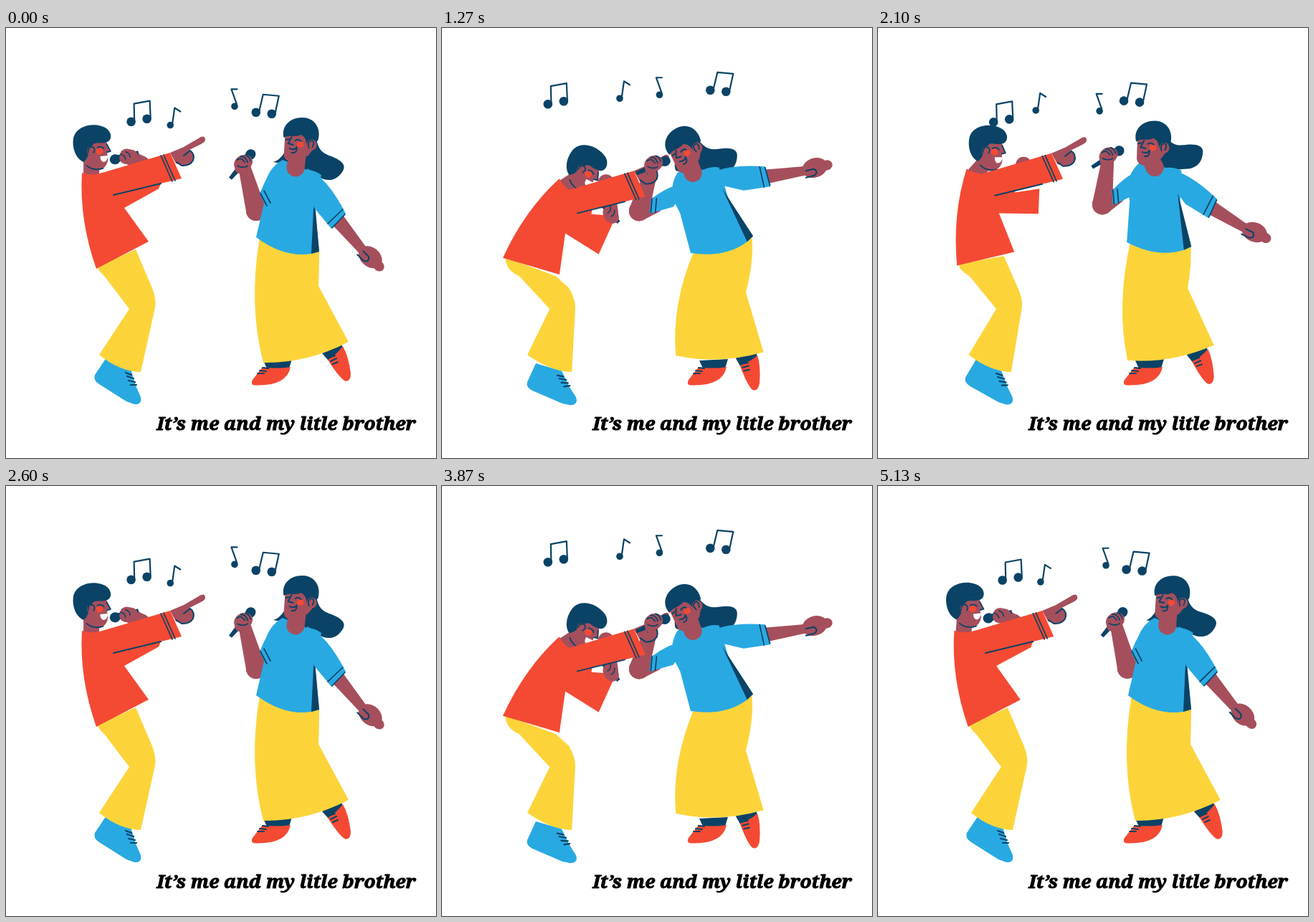
An HTML page with a canvas for the animation above (5160 ms loop, 600 by 600 pixels).

```html
<!DOCTYPE html>
<html lang="en">
<head>
<meta charset="utf-8">
<title>Singing siblings</title>
<style>
  html, body { margin: 0; width: 100%; height: 100%; overflow: hidden; background: #fff; }
  canvas, svg { position: absolute; left: 0; top: 0; width: 600px; height: 600px; }
  text { font: italic 900 22px "Noto Serif", "DejaVu Serif", serif; stroke: #000; stroke-width: 1px; }
</style>
</head>
<body>
<canvas id="stage" width="600" height="600"></canvas>
<svg viewBox="0 0 600 600"><text id="caption" x="572" y="561" text-anchor="end">It’s me and my litle brother</text></svg>
<script>
const LOOP = 5160, SWING = 2600;
const NAVY = '#0a4366', SKIN = '#a54f5d', RED = '#f44a34', YELLOW = '#fcd43a', BLUE = '#29a9e2';
const ctx = document.getElementById('stage').getContext('2d');
ctx.lineCap = ctx.lineJoin = 'round';

const caption = document.getElementById('caption');
caption.style.fontSize = 22 * 362 / caption.getComputedTextLength() + 'px';

// ---- motion ----

// Pictures hold for 1/15 s, with one longer hold every 700 ms.
function snap(t) {
  const block = Math.floor(t / 700) * 700, b = t - block;
  return b < 97 ? block : block + 100 + Math.floor((b - 96) * 3 / 200) * 200 / 3;
}

const rad = deg => deg * Math.PI / 180;
const mix = (a, b, s) => a.map((v, i) => v + (b[i] - v) * s);
const wave = (t, phase, times = 1) => Math.cos(2 * Math.PI * times * t / SWING - rad(phase));
const lean = t => (1 - wave(t, 0)) / 2;
const easeSin = s => Math.sin(s * Math.PI / 2);
const easeCubic = s => 1 - (1 - s) ** 3;

// A rigid body: its anchor sits at `at`, turned by deg.
function frame([ax, ay], [x, y], deg) {
  const c = Math.cos(rad(deg)), s = Math.sin(rad(deg));
  return {
    to: (px, py) => [x + c * (px - ax) - s * (py - ay), y + s * (px - ax) + c * (py - ay)],
    paint(draw) {
      ctx.save();
      ctx.transform(c, s, -s, c, x, y);
      ctx.translate(-ax, -ay);
      draw();
      ctx.restore();
    }
  };
}

// ---- drawing ----

function fill(color, d) {
  ctx.fillStyle = color;
  ctx.fill(new Path2D(d));
}

function line(d, width = 2) {
  ctx.strokeStyle = NAVY;
  ctx.lineWidth = width;
  ctx.stroke(new Path2D(d));
}

function oval(color, x, y, rx, ry = rx, turn = 0) {
  ctx.beginPath();
  ctx.ellipse(x, y, rx, ry, turn, 0, 7);
  ctx.fillStyle = color;
  ctx.fill();
}

// Tapered limb with round ends.
function limb([ax, ay], [bx, by], ra, rb) {
  const turn = Math.atan2(by - ay, bx - ax) + Math.PI / 2;
  const nx = Math.cos(turn), ny = Math.sin(turn);
  fill(SKIN, `M${ax + nx * ra} ${ay + ny * ra}L${bx + nx * rb} ${by + ny * rb}
    L${bx - nx * rb} ${by - ny * rb}L${ax - nx * ra} ${ay - ny * ra}Z`);
  oval(SKIN, ax, ay, ra);
  oval(SKIN, bx, by, rb);
}

// Microphone along x with its head at `side`.
function mic(size, side) {
  const h = size * side;
  fill(NAVY, `M${h} -5L${-h} -2.5L${-h} 2.5L${h} 5Z`);
  oval(NAVY, h, 0, 7.5, 7);
}

// ---- notes ----

function note(x, y, double, slant) {
  frame([0, 0], [x, y], 0).paint(() => {
    const r = double ? 6.3 : 4.8;
    oval(NAVY, 0, 0, r);
    if (double) {
      oval(NAVY, 22, -slant, r);
      line(`M4.5 -2L${8 - slant} -25L${30 - slant} ${-25 - slant}L27 ${-2 - slant}`, 2.2);
    } else {
      line(`M3 -3L${slant} -24L${slant + 8} ${slant > 0 ? -19 : -24}`, 2.2);
    }
  });
}

function drawNotes(t) {
  const bob = 5.5 * wave(t, 63, 2);
  note(161 + 14.5 * wave(t, 20), 117 + 20 * wave(t, -56) + bob, true, 4);
  note(361 + 19 * wave(t, 130), 102 + 17 * wave(t, 22), true, -2);
  note(238 + 18 * wave(t, 119), 116.5 + 21 * wave(t, 25), false, 6);
  note(311 + 9.4 * wave(t, 32), 100 + 21 * wave(t, -71) + bob, false, -4.5);
}

// ---- boy ----

const BOY_HIP = [162, 317];
const boyTorso = s => frame(BOY_HIP, mix(BOY_HIP, [124, 332], s), 44 * s);

function boyHead() {
  fill(SKIN, 'M108 160L138 156L145.5 172L140.5 174L142 183C141 193 134 199 125 199L108 199Z');
  line('M112 192Q121 200 135 196', 1.8);
  fill(NAVY, 'M108 187C96 182 91 165 94 152C98 138 118 132 133 137C148 141 150 158 138 160C128 162 123 158 120 164C115 172 115 181 108 187Z');
  oval(SKIN, 119, 172, 6.5, 7);
  line('M114 174Q114 165 120 166Q125 168 122 174', 1.8);
  oval(RED, 130, 172, 5, 4.5);
  line('M127 167Q132 164 136 168M140 162L145.5 172L140.5 173.5', 1.8);
  fill('#fff', 'M131 179L142 178Q141 187 135 187Q131 185 131 179Z');
}

function boyPointingArm() {
  fill(SKIN, 'M229 174L248 166L272 152Q278 150 278 156Q278 159 272 162L256 170Q263 175 261 184Q257 192 247 192L237 189Z');
  line('M248 178L257 171Q264 176 261 185Q256 193 245 192L238 187');
  fill(RED, 'M131 203L229 174L245 210L150 233Z');
  line('M150 233L216 217', 2);
  line('M220 177L236 213M216 178L232 214', 1.7);
}

function boyLegs(s, torso) {
  const shift = (x, y) => [x - 0.17 * s * (520 - y), y];
  const left = torso.to(128, 333), right = torso.to(181 + 16 * s, 309 - 6 * s);
  frame([187, 522], [187, 522], -9 * s).paint(() => {
    fill(BLUE, 'M140 460L174 476L181 499L188 515Q190 526 179 525L168 521L130 497Q121 491 124 484Z');
    line('M167 481L175 484M169 486L178 489M171 492L180 494M174 498L182 498', 2.2);
  });
  fill(YELLOW, `M${left}L${right}L${shift(204, 363)}Q${shift(210, 378)} ${shift(208, 390)}
    L${shift(188, 480)}Q${shift(158, 479)} ${shift(130, 456)}L${shift(172, 392)}
    L${shift(137, 346)}Q${left[0]} ${left[1] + 5 + 13 * s} ${left}Z`);
}

function drawBoy(s, late) {
  const torso = boyTorso(s);
  const headAt = boyTorso(late).to(119, 160);
  const head = frame([119, 160], headAt, 33 * late * late);
  boyLegs(s, torso);

  limb(head.to(119, 187), torso.to(119, 206), 11, 11);
  head.paint(boyHead);
  torso.paint(() => fill(RED,
    'M106 202Q118 206 131 203L165 195L185 225L165 251L199 298L126 336Q102 268 106 202Z'));

  // The pointing arm keeps its direction and only follows the shoulder.
  const [sx, sy] = torso.to(131, 203);
  const arm = frame([131, 203], [sx - 11 * s, sy], 0);

  const pit = torso.to(165, 251);
  const elbow = frame([0, 0], pit, -29 + 61 * easeSin(s)).to(55, 0);
  const [ex, ey] = arm.to(216, 217);
  fill(RED, `M${pit}L${elbow}L${ex - 12 * s} ${ey + 20 * s}L${arm.to(150, 233)}Z`);

  const fist = [168 + 68 * easeSin(late), 178 + 81 * late];
  limb(fist, arm.to(190, 190), 10, 11);
  frame([0, 0], fist, -17 + 70 * late).paint(() => {
    mic(17, -1);
    oval(SKIN, 2, 2, 13, 10);
    line('M-8 -5Q-2 -2 -3 4M0 -6Q5 -3 4 3', 1.5);
  });
  arm.paint(boyPointingArm);
}

// ---- girl ----

const GIRL_HIP = [393, 303];

function girlHead() {
  fill(SKIN, 'M390 146L388 177C389 187 401 189 410 184L422 178L430 168L426 146Z');
  fill(NAVY, 'M388 153C384 136 398 124 415 125C433 126 440 142 436 156C433 162 428 155 424 162L420 163C419 156 418 152 412 149C404 153 395 148 388 153Z');
  oval(SKIN, 427, 163, 7, 7.5);
  line('M423 167Q420 158 427 157Q432 158 428 166', 1.8);
  oval(RED, 411, 162.5, 4.8, 4.3);
  line('M399 152L394 161L401 163M404 157Q409 154 412 158M391 156L395 155');
  line('M396 168Q404 171 406 166M399 174Q406 175 406 168');
}

function girlHair(t, at) {
  const flow = wave(t, 50), reach = 26 + 18 * flow;
  frame([0, 0], at, 0).paint(() => fill(NAVY, `M${-reach} 25Q-20 20 -12 -16L14 -10L8 34Z`));
  frame([0, 0], at, 14 + 23 * flow).paint(() =>
    fill(NAVY, 'M14 -20C26 -4 34 -4 46 -6C60 -8 70 -6 70 3C70 16 64 24 53 27Q24 30 0 36Z'));
}

function girlSkirt(s, torso) {
  const hem = frame([418, 452], mix([418, 452], [387, 454], s), 11.5 * s);
  const left = torso.to(354, 292), right = torso.to(437, 305);
  fill(YELLOW, `M${left}Q${338 - 18 * s} 387 ${hem.to(359, 467)}
    Q${hem.to(420, 468)} ${hem.to(478, 438)}L${436 - 12 * s} ${360 + 9 * s}
    Q${right[0] + 7 * s} ${right[1] + 30} ${right}Z`);
}

function girlFeet(s) {
  fill(NAVY, 'M359 464L399 462L395 475L364 475Z');
  fill(RED, 'M358 473Q378 476 397 473Q392 499 350 498.5Q340 499 344 491Z');
  line('M351 482L360 482M354 478L363 479M358 474L366 475');
  frame([476, 492], mix([476, 492], [436, 505], s), 12 * s).paint(() => {
    fill(NAVY, 'M441 454L468 441L471 450L450 464Z');
    fill(RED, 'M449 463Q462 455 470 444Q478 458 481 482Q481 494 473 492.5Q465 488 449 463Z');
    line('M451 460L459 457M453 465L461 461M456 469L463 466');
  });
}

function girlTorso() {
  fill(BLUE, 'M386 184Q368 194 362 215L362 236L349 292Q388 321 426 315L437 312L431 250L440 205Q430 198 420 198Z');
  fill(NAVY, 'M430 233L437 312L426 315Z');
}

// Straight arm, drawn around its shoulder.
function girlOpenArm() {
  limb([22, 62], [56, 103], 10, 6.5);
  frame([0, 0], [56, 103], 40).paint(() => {
    oval(SKIN, 17, 1, 18, 13.5);
    oval(SKIN, 34, 3, 8, 7);
    line('M1 10L13 11Q21 8 15 2L4 1');
  });
  fill(BLUE, 'M-20 -9Q8 3 34 54L14 75L-10 46L-20 15Z');
  line('M33 55L15 74M30 48L9 68', 1.7);
}

function girlSleeve() {
  fill(BLUE, 'M14 -16Q-7 0 -18 32L-9 50L14 24Z');
  line('M-17 31L-8 48M-12 27L-3 44', 1.7);
}

// Draws the girl and returns where her singing hand is.
function drawGirl(t, s, late) {
  const torso = frame(GIRL_HIP, mix(GIRL_HIP, [391, 303], s), -28 * s);
  const headAt = mix([411, 162], [341, 174], late);
  const head = frame([411, 162], headAt, -30 * late ** 3);
  const lift = easeCubic(s);
  const sleeve = frame([0, 0], torso.to(372, 200), 33 * lift);
  const elbow = sleeve.to(-23, 55);
  const fist = frame([0, 0], elbow, -15 + 32 * lift).to(0, -69);

  girlFeet(s);
  girlHair(t, headAt);
  girlSkirt(s, torso);
  limb(sleeve.to(-9, 36), elbow, 11, 14);
  limb(elbow, fist, 14, 8);
  torso.paint(girlTorso);
  sleeve.paint(girlSleeve);
  frame([0, 0], torso.to(440, 205), -59 * s).paint(girlOpenArm);
  limb(head.to(407, 178), torso.to(404, 195), 12, 12.5);
  head.paint(girlHead);
  return { fist, lift };
}

function drawGirlFist({ fist: [x, y], lift }) {
  frame([0, 0], [x - 4, y + 5], -50 + 27 * lift).paint(() => mic(22, 1));
  frame([0, 0], [x, y], 0).paint(() => {
    oval(SKIN, 0, 0, 13.5, 11, -0.5);
    oval(SKIN, -4, 7, 8);
    line('M-9 -4Q-3 -9 2 -1M-4 -9Q3 -10 6 -1M3 -11Q9 -9 10 -3M-8 4Q0 8 6 4', 1.8);
  });
}

// ---- main ----

function draw(time) {
  const t = snap(time) % SWING;
  const s = lean(t), late = lean(t - 60);
  ctx.fillStyle = '#fff';
  ctx.fillRect(0, 0, 600, 600);
  const hand = drawGirl(t, s, late);
  drawBoy(s, late);
  drawGirlFist(hand);
  drawNotes(t);
}

const start = performance.now();
function tick() {
  draw((performance.now() - start) % LOOP);
  requestAnimationFrame(tick);
}
tick();
</script>
</body>
</html>
```
